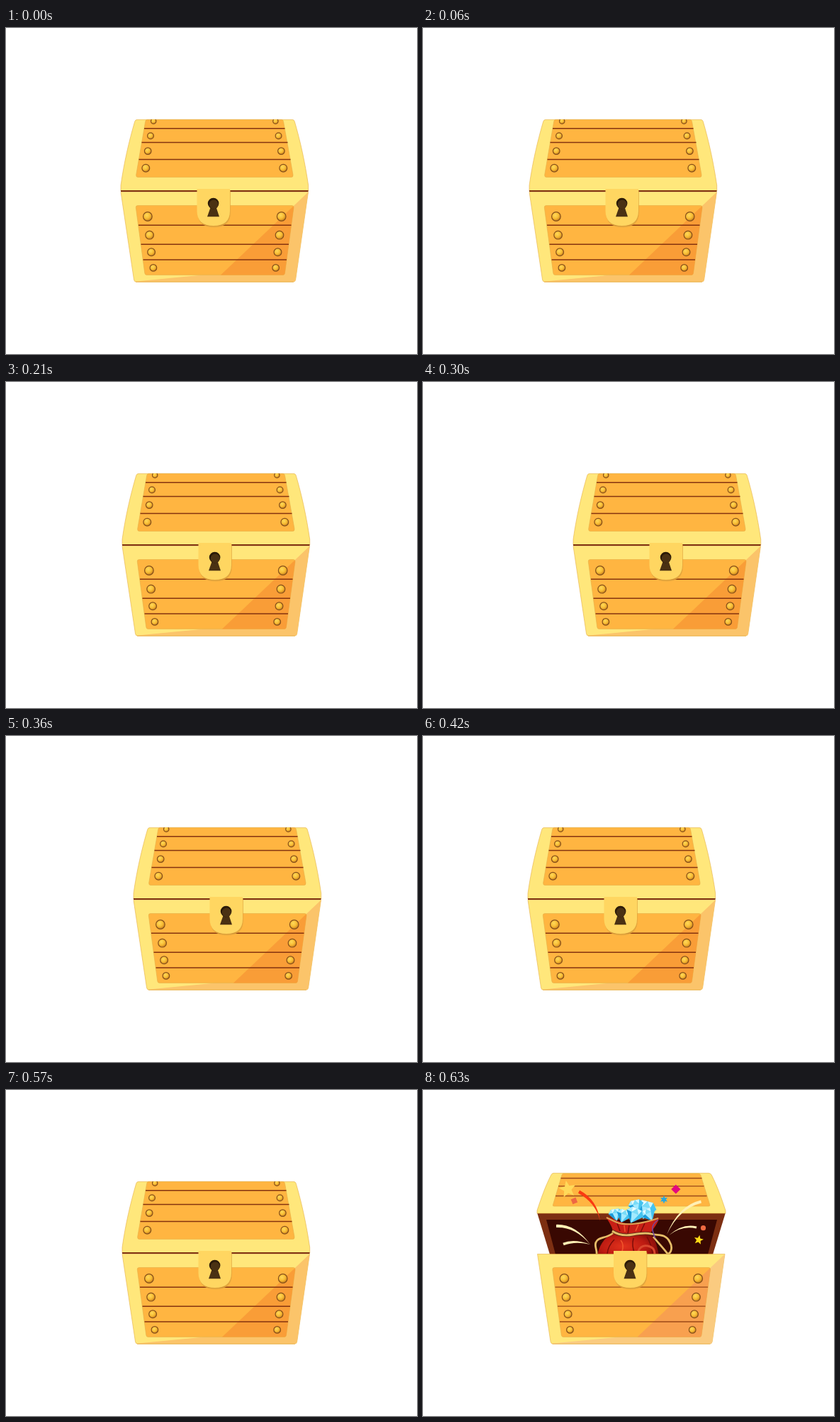
Write an HTML page that moves like this. It is 580 px wide and 460 px high and loops after 5.63 s.

```html
<!DOCTYPE html>
<html lang="en">
<head>
<meta charset="utf-8">
<title>Treasure chest</title>
<style>
  html, body { margin: 0; width: 100%; height: 100%; overflow: hidden; background: #fff; }
  svg { display: block; width: 580px; height: 460px; }
  .plank { fill: none; stroke: #84330f; stroke-width: 1.5; }
  .edge { stroke: #e5ae45; stroke-width: .6; }
  .closed { --shade: #f99d37; --rim: #fbc46a; }
  .open { --shade: #f8a04f; --rim: #facb80; }
  .open .plank { stroke: #9c4a18; stroke-width: 1.3; }
</style>
</head>
<body>
<svg viewBox="0 0 580 460">
  <defs>
    <radialGradient id="rivet" cx=".4" cy=".36" r=".65">
      <stop offset="0" stop-color="#ffd95a"/>
      <stop offset=".55" stop-color="#f8bd35"/>
      <stop offset="1" stop-color="#c67d1c"/>
    </radialGradient>
    <radialGradient id="velvet" cx=".42" cy=".5" r=".65">
      <stop offset="0" stop-color="#e2321c"/>
      <stop offset=".55" stop-color="#bd1b12"/>
      <stop offset="1" stop-color="#6d0906"/>
    </radialGradient>
    <clipPath id="lidTop"><rect x="150" y="129" width="290" height="100"/></clipPath>
    <clipPath id="aboveBase"><rect x="150" y="100" width="290" height="131.5"/></clipPath>
  </defs>

  <g id="closed" class="closed">
    <path class="edge" fill="#ffe77b" d="M185 129.3H404Q406.500 129.300 407.300 132C415.500 160 422 190 426.700 222V230H162V222C166.500 190 173.500 160 181.700 132Q182.500 129.300 185 129.300Z"/>
    <path class="edge" fill="#ffb541" d="M199 129.300H389Q391 129.300 391.500 132L405 207Q405.500 210.500 402.500 210.500H186Q183.200 210.500 183.700 207L196.700 132Q197.200 129.300 199 129.300Z"/>
    <path class="plank" d="M195 141.700H393.500M191.500 161.500H397.500M187.500 185.500H401.500"/>
    <g id="lidRivets" clip-path="url(#lidTop)"></g>
    <g id="closedBase"></g>
    <path stroke="#7e3210" stroke-width="2" d="M162 230H426.500"/>
    <g id="closedLatch"></g>
  </g>

  <g id="open" class="open">
    <path fill="#7d2f12" d="M161 173H427L409 232H179Z"/>
    <path fill="#390802" d="M174 183H415L402 232H187Z"/>
    <path class="edge" fill="#ffe77b" d="M184 117.300H403Q406 117.300 407.300 120C416 137 422 155 427 170V174H161V170C166 155 172 137 180.700 120Q182 117.300 184 117.300Z"/>
    <path class="edge" fill="#ffb541" d="M198 118H389Q391 118 391.800 120L404.800 162Q405.300 164 403 164H185Q182.800 164 183.400 162L196 120Q196.600 118 198 118Z"/>
    <path class="plank" d="M194.500 124.500H393.500M191 135.700H396.500M187 149.500H400.500"/>
    <g id="loot" clip-path="url(#aboveBase)">
      <g id="gems"></g>
      <path fill="url(#velvet)" d="M268 202C254 209 247 222 245 240H334C331 222 329 211 319 201Z"/>
      <path fill="#c82016" d="M258 179C269 181 274 186 286 188C302 190 319 184 333 180C332 188 326 194 321 202C304 208 283 206 268 200C267 192 262 186 258 179Z"/>
      <path fill="none" stroke="#7a0c08" stroke-width="1.500" d="M274 188L278 199M291 191L289 203M313 188L306 203M270 211Q261 220 260 231M297 209Q294 220 299 231M316 207Q323 219 324 231"/>
      <path fill="none" stroke="#f0552c" stroke-width="1.600" d="M279 212Q284 218 281 228M284 191L285 200M304 190L300 199"/>
      <path fill="none" stroke="#dca354" stroke-width="2" d="M259 180Q267 184 274 187T296 189T332 181"/>
      <path fill="none" stroke="#5d2713" stroke-width="4.600" d="M267 199Q279 207 296 204T322 203"/>
      <path fill="none" stroke="#e6bd68" stroke-width="2.800" d="M267 199Q279 207 296 204T322 203C331 206 342 202 348 214C353 222 350 231 345 231C340 224 333 217 325 207M268 202C258 210 247 207 244 215C241 221 248 229 244 235"/>
      <path fill="none" stroke="#7547a0" stroke-width="1.500" d="M332 183Q322 190 324 198T328 209"/>
      <path fill="none" stroke="#d9472e" stroke-width="3" d="M303 229Q307 218 317 220T327 231"/>
    </g>
    <g id="confetti"></g>
    <g id="openBase" transform="translate(-.5 0)"></g>
    <g id="openLatch" transform="translate(-.5 0)"></g>
  </g>
</svg>
<script>
const byId = id => document.getElementById(id);
const MID = 294.3;

const rivet = (x, y, r) =>
  `<circle cx="${x}" cy="${y}" r="${r}" fill="url(#rivet)" stroke="#85501b" stroke-width="1.2"/>`;
const rivetRows = rows => rows.map(([x, y, r]) =>
  rivet(x, y, r) + rivet(2 * MID - x, y, r)).join("");
const poly = (points, fill) => `<polygon points="${points}" fill="${fill}"/>`;

function star(x, y, outer, inner, tips, turn, fill) {
  const points = Array.from({ length: tips * 2 }, (_, i) => {
    const angle = turn + i * Math.PI / tips;
    const radius = i % 2 ? inner : outer;
    return [x + radius * Math.sin(angle), y - radius * Math.cos(angle)].map(v => v.toFixed(2));
  });
  return poly(points.join(" "), fill);
}

// A curved ribbon, wide at its first end and pointed at the other.
function streak(x0, y0, cx, cy, x1, y1, width, fill) {
  const length = Math.hypot(cx - x0, cy - y0);
  const nx = -(cy - y0) / length * width / 2, ny = (cx - x0) / length * width / 2;
  return `<path fill="${fill}" d="M${x0 + nx} ${y0 + ny}Q${cx + nx} ${cy + ny} ${x1} ${y1}
    Q${cx - nx} ${cy - ny} ${x0 - nx} ${y0 - ny}Z"/>`;
}

function gem(x, y, size, turn) {
  return `<g transform="translate(${x} ${y}) rotate(${turn}) scale(${size})">
    ${poly("-1,-.25 -.55,-.8 .55,-.8 1,-.25 0,.9", "#45c3ef")}
    ${poly("-1,-.25 -.55,-.8 -.4,-.25", "#a8ecff")}
    ${poly("-.55,-.8 0,-.8 -.4,-.25", "#e6fbff")}
    ${poly("0,-.8 .4,-.25 -.4,-.25", "#79dcf8")}
    ${poly("0,-.8 .55,-.8 .4,-.25", "#d0f6ff")}
    ${poly("-1,-.25 -.4,-.25 0,.9", "#1c9cdb")}
    ${poly("-.4,-.25 .4,-.25 0,.9", "#a3eaff")}
  </g>`;
}

const base = `
  <path class="edge" fill="#ffe77b" d="M162 231.500H426.500L408.700 355Q408.200 358.300 405 358.300H184Q181 358.300 180.500 355Z"/>
  <path fill="var(--rim)" d="M426.500 231.500L303 348.500L277 348.500L182 357.800Q183 358.300 185 358.300H405Q408.200 358.300 408.700 355Z"/>
  <path fill="none" stroke="#e8b04a" stroke-width=".7" d="M183 358.300H406"/>
  <path class="edge" fill="#ffb541" d="M186 250.500H403.500Q406.500 250.500 406 253.500L393.500 346Q393 348.500 391 348.500H198.500Q196.300 348.500 195.800 346L183.300 253.500Q183 250.500 186 250.500Z"/>
  <path fill="var(--shade)" d="M405.500 251.500L303 348.500H391Q393 348.500 393.500 346L406 253.500Z"/>
  <path class="plank" d="M187 278.200H402.500M190.500 305.200H399M193.500 327H396"/>
  ${rivetRows([[199.900, 266, 6.300], [202.600, 292.200, 5.800], [205.100, 316.300, 5.400], [207.900, 338.400, 4.800]])}`;

const latchShape = "M269.500 227H316V258Q316 279 292.800 279T269.500 258Z";
const latch = `
  <path fill="#dfa43c" opacity=".85" transform="translate(.8 2.3)" d="${latchShape}"/>
  <path fill="#ffd661" d="${latchShape}"/>
  <path fill="#4a3113" d="M289 252H296.300L301 266.300H284Z"/>
  <circle cx="292.600" cy="247.600" r="7.800" fill="#2b1a08"/>
  <circle cx="293.200" cy="249" r="6.400" fill="#4a3113"/>`;

byId("lidRivets").innerHTML =
  rivetRows([[208.200, 131.500, 3.700], [204, 152.200, 4.400], [200.200, 173.600, 4.800], [197.300, 197.700, 5.400]]);
for (const state of ["closed", "open"]) {
  byId(state + "Base").innerHTML = base;
  byId(state + "Latch").innerHTML = latch;
}
byId("gems").innerHTML = [
  [314, 169, 15, 14], [301, 164, 11, -12], [272, 176, 10, -8],
  [283, 178, 11, 20], [319, 176, 11, -28], [298, 177, 13, 24]
].map(args => gem(...args)).join("");

const cream = "#fff0b5";
byId("confetti").innerHTML =
  star(204, 140, 12.5, 5.5, 5, -.18, "#ffd95a") +
  star(213.400, 156.400, 5.200, 3.600, 4, .4, "#ee6744") +
  star(356.800, 140, 6.600, 4.650, 4, 0, "#e4087f") +
  star(340, 154.600, 5.800, 2.800, 6, 0, "#2aa7dc") +
  star(389, 211.500, 7, 3, 5, .2, "#ffdc16") +
  `<circle cx="395.500" cy="194.700" r="3.600" fill="#f06a42"/>` +
  streak(220, 143.500, 245, 157, 250, 185, 4.500, "#fa3b12") +
  streak(392.500, 157.500, 361, 165, 344, 204, 4, cream) +
  streak(386, 194, 366, 189, 347, 205, 3, cream) +
  streak(188, 192, 215, 191, 236, 218, 4.200, cream) +
  streak(198, 217.500, 214, 211, 236, 218, 3.800, cream);

const LOOP = 5630, STEP = 30, OPEN_AT = 630;
const swings = [0, -30, 50, -30, 10];
const STEPS_PER_SWING = 5;

function shakeOffset(step) {
  const i = Math.min(Math.floor(step / STEPS_PER_SWING), swings.length - 2);
  return swings[i] + (swings[i + 1] - swings[i]) * (step / STEPS_PER_SWING - i);
}

function render(time) {
  const t = time % LOOP;
  const isOpen = t >= OPEN_AT;
  byId("open").style.display = isOpen ? "" : "none";
  byId("closed").style.display = isOpen ? "none" : "";
  if (!isOpen) {
    byId("closed").setAttribute("transform", `translate(${shakeOffset(Math.floor(t / STEP))} 0)`);
  }
}

const start = performance.now();
function tick() {
  render(performance.now() - start);
  requestAnimationFrame(tick);
}
tick();
</script>
</body>
</html>
```
